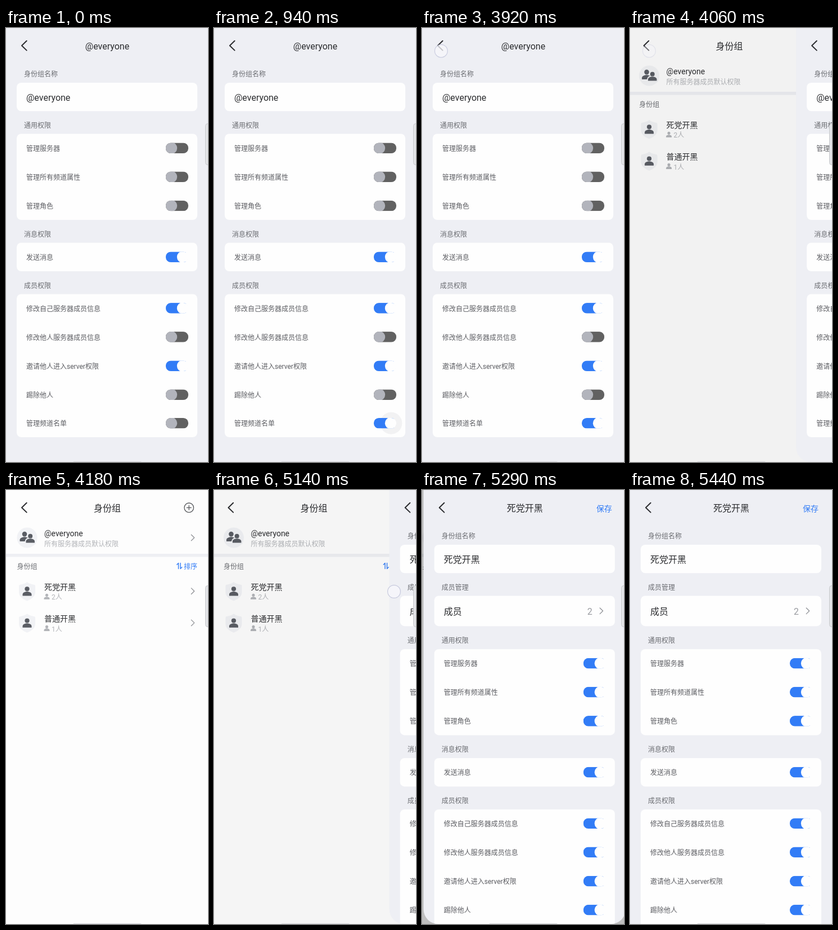
Write an HTML page that moves like this. It is 359 px wide and 769 px high and loops after 8000 ms.

```html
<!DOCTYPE html>
<html lang="zh-CN">
<head>
<meta charset="utf-8">
<title>身份组</title>
<style>
  html, body { margin: 0; width: 100%; height: 100%; overflow: hidden; background: #fdfdfd; }
  #stage { position: relative; width: 359px; height: 769px; overflow: hidden; }
  .page, #dim, #overlay { position: absolute; left: 0; top: 0; width: 359px; height: 769px; }
  .page { overflow: hidden; background: #eeeff4; }
  #list { background: #fdfdfd; }
  #dim { background: #000; }
  svg { display: block; }
  text { font-family: Roboto, "Noto Sans CJK SC", "Noto Sans CJK", sans-serif; }
</style>
</head>
<body>
<div id="stage">
  <div class="page" id="list"></div>
  <div id="dim"></div>
  <div class="page" id="everyone"></div>
  <div class="page" id="role"></div>
  <div id="overlay"></div>
</div>
<script>
const W = 359, H = 769, LOOP = 8000;
const INK = '#2b2c2f', ROW = '#5c5d62', LABEL = '#6a6c71', PALE = '#b2b4b8', BLUE = '#327cf6';
const ON = { track: [50, 124, 246], thumb: [254, 254, 254] };
const OFF = { track: [97, 97, 97], thumb: [178, 180, 188] };
const $ = id => document.getElementById(id);

const svg = body => `<svg width="${W}" height="${H}" viewBox="0 0 ${W} ${H}">${body}</svg>`;
const text = (x, cy, size, fill, str, anchor = 'start') =>
  `<text x="${x}" y="${cy + size * 0.4}" font-size="${size}" fill="${fill}" text-anchor="${anchor}">${str}</text>`;
const card = (y, h) => `<rect x="19" y="${y}" width="321" height="${h}" rx="8" fill="#fefefe"/>`;
const line = (d, color, width) =>
  `<path d="${d}" fill="none" stroke="${color}" stroke-width="${width}" stroke-linecap="round" stroke-linejoin="round"/>`;
const back = line('M36.7 22.8L28 31.2L36.7 39.6', INK, 2);
const next = (x, y) => line(`M${x - 2.7} ${y - 5.3}l5.4 5.3l-5.4 5.3`, '#8b8d92', 1.2);
const rgb = c => `rgb(${c.map(Math.round)})`;
const mix = (a, b, k) => a.map((v, i) => v + (b[i] - v) * k);

// The track ends under the thumb when on
const trackWidth = k => 40 - 4 * k;

function toggle(y, on, id) {
  const c = on ? ON : OFF;
  return `<g ${id ? `id="${id}"` : ''}>
    <circle class="ripple" cx="314.8" cy="${y}" r="0" fill="#f2f2f3"/>
    <g clip-path="url(#pill)" transform="translate(0 ${y})">
    <rect class="track" x="284" y="-9.3" width="${trackWidth(+on)}" height="18.6" fill="${rgb(c.track)}"/>
    <circle class="thumb" cx="${on ? 314 : 294}" r="10.2" fill="${rgb(c.thumb)}"/></g></g>`;
}
const pill = '<clipPath id="pill"><rect x="284" y="-9.3" width="40" height="18.6" rx="8.8"/></clipPath>';

// Shared permission groups: label, label y, card y, card height, rows
const GROUPS = [
  ['通用权限', 172, 187.5, 152.5, [['管理服务器', 213], ['管理所有频道属性', 264], ['管理角色', 315.3]]],
  ['消息权限', 365, 380.5, 50.5, [['发送消息', 406]]],
  ['成员权限', 455.7, 471.5, 253.5, [['修改自己服务器成员信息', 496.7], ['修改他人服务器成员信息', 547.7],
    ['邀请他人进入server权限', 599], ['踢除他人', 650], ['管理频道名单', 700.5]]],
];
const DEFAULT_ON = ['发送消息', '修改自己服务器成员信息', '邀请他人进入server权限'];

const permissions = (dy, isOn, lastId) =>
  `<g transform="translate(0 ${dy})">` + GROUPS.map(([name, ly, cy, h, rows]) =>
    text(32, ly, 12, LABEL, name) + card(cy, h) + rows.map(([label, y]) =>
      text(36, y, 12, ROW, label) +
      toggle(y - 0.3, isOn(label), label === '管理频道名单' ? lastId : '')).join('')).join('') + '</g>';

const header = name => back + text(180, 32, 16, INK, name, 'middle') +
  text(32, 81.3, 12, LABEL, '身份组名称') + card(97, 50.3) + text(36, 122.3, 16, INK, name);

const person = (x, y, s, fill) =>
  `<g transform="translate(${x} ${y}) scale(${s})" fill="${fill}"><circle cy="-4.2" r="4.1"/>
  <path d="M-8 8V5.5C-8 2-3 .6 0 .6S8 2 8 5.5V8Z"/></g>`;

const member = (y, name, count) =>
  `<path d="M37.5 ${y - 16.5}C41 ${y - 13.5} 46 ${y - 12.5} 51 ${y - 11.5}Q52 ${y - 11} 52 ${y - 9}V${y + 2}
    C52 ${y + 9} 45 ${y + 14} 37.5 ${y + 17}C30 ${y + 14} 23 ${y + 9} 23 ${y + 2}V${y - 9}
    Q23 ${y - 11} 24 ${y - 11.5}C29 ${y - 12.5} 34 ${y - 13.5} 37.5 ${y - 16.5}Z" fill="#f1f2f5"/>` +
  person(37.5, y, 1, '#5a5d64') + text(68, y - 8.4, 14, INK, name) +
  person(72.5, y + 9.3, 0.62, PALE) + text(81, y + 10, 12, PALE, count) + next(332, y - 0.3);

$('everyone').innerHTML = svg(header('@everyone') + permissions(0, l => DEFAULT_ON.includes(l), 'sw'));

$('role').innerHTML = svg(header('死党开黑') + text(335, 32, 14, BLUE, '保存', 'end') +
  text(32, 172, 12, LABEL, '成员管理') + card(187.5, 53.7) + text(36, 215, 16, INK, '成员') +
  text(291, 214.6, 16, '#999ba0', '2') + next(316, 214.3) + permissions(94.4, () => true, ''));

$('list').innerHTML = svg(back + text(180, 31.8, 16, INK, '身份组', 'middle') +
  '<circle cx="325.2" cy="31.3" r="8.3" fill="none" stroke="#55575b" stroke-width="1.3"/>' +
  line('M321.2 31.3h8M325.2 27.3v8', '#55575b', 1.3) +
  '<circle cx="37.5" cy="84.5" r="18" fill="#f1f2f5"/>' +
  person(33, 82.5, 1.05, '#5a5d64') +
  '<path d="M33.5 96V91Q34.5 84 43.5 84H53V96Z" fill="#f1f2f5"/>' +
  person(43.2, 85.7, 0.97, '#5a5d64') +
  text(68, 76.3, 14, INK, '@everyone') + text(68, 95, 12, PALE, '所有服务器成员默认权限') + next(332, 84.5) +
  `<rect y="113" width="${W}" height="5.5" fill="#eeeff3"/>` +
  text(19.6, 135.3, 12, LABEL, '身份组') + text(340, 135.3, 12, BLUE, '排序', 'end') +
  line('M303.8 132.2l2.7-2.7v10M310 129.5v10l2.7-2.7', BLUE, 1.4) +
  member(179.5, '死党开黑', '2人') + member(235.7, '普通开黑', '1人'));

$('overlay').innerHTML = svg(pill +
  '<circle id="touch" r="11.4" fill="#f7f7fb" fill-opacity=".94" stroke="#c2c5db" stroke-width="1.2"/>' +
  '<rect x="354.5" y="169.5" width="12" height="73" rx="4" fill="#e4e5e8" stroke="#c6c8cc"/>' +
  '<rect x="119.5" y="767.8" width="121" height="3" rx="1.5" fill="#d9dade"/>');

const clamp = v => Math.min(1, Math.max(0, v));
const ramp = (t, from, to) => clamp((t - from) / (to - from));
const ease = k => k * k * (3 - 2 * k);

// Critically damped slide, sampled every 30 ms; returns 1 -> 0
function spring(t, start) {
  if (t < start) return 1;
  const x = 0.042 * (15 + Math.floor((t - start) / 30) * 30);
  return (1 + x) * Math.exp(-x);
}

// x, y, shown from, fade from, fade to, peak opacity
const TOUCHES = [
  [37.5, 44.2, 2840, 3030, 3180, 1],
  [34, 40.7, 3920, 3980, 4130, 0.8],
  [320, 180, 5000, 5140, 5270, 0.9],
];

const sw = $('sw'), ripple = sw.querySelector('.ripple');
const track = sw.querySelector('.track'), thumb = sw.querySelector('.thumb');

function drawSwitch(t) {
  const k = ease(ramp(t, 500, 720));
  thumb.setAttribute('cx', 294 + 20 * k);
  thumb.setAttribute('fill', rgb(mix(OFF.thumb, ON.thumb, k)));
  track.setAttribute('fill', rgb(mix(OFF.track, ON.track, k)));
  track.setAttribute('width', trackWidth(k));
  const shown = t >= 500 && t < 2840;
  ripple.setAttribute('cx', 294.8 + 20 * k);
  ripple.setAttribute('r', shown ? 8 + 11.5 * ease(ramp(t, 500, 800)) : 0);
}

function place(page, x) {
  const moving = x > 0.4;
  page.style.visibility = x < W - 0.4 ? 'visible' : 'hidden';
  page.style.transform = `translateX(${moving ? x : 0}px)`;
  page.style.borderRadius = moving ? '0 0 26px 26px' : '0';
}

function draw(t) {
  drawSwitch(t);
  const leave = 1 - spring(t, 3980), enter = spring(t, 5140);
  place($('everyone'), t < 4180 ? W * leave : W);
  place($('role'), t < 5440 ? W * enter : 0);
  const cover = t < 4180 ? 1 - leave : 1 - enter;
  $('list').style.transform = `translateX(${-19 * cover}px)`;
  $('dim').style.opacity = 0.25 * cover;

  const hit = TOUCHES.find(p => t >= p[2] && t < p[4]);
  $('touch').setAttribute('opacity', hit ? hit[5] * (1 - ramp(t, hit[3], hit[4])) : 0);
  if (hit) $('touch').setAttribute('transform', `translate(${hit[0]} ${hit[1]})`);
}

const t0 = performance.now();
function frame() {
  draw((performance.now() - t0) % LOOP);
  requestAnimationFrame(frame);
}
frame();
</script>
</body>
</html>
```
